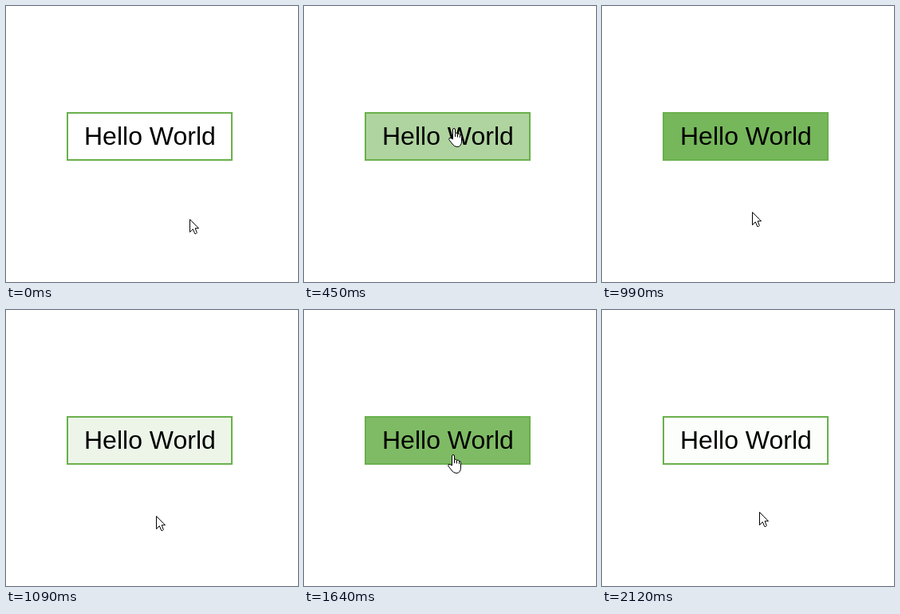
Recreate the animation shown at these times as an HTML page with a canvas. Size 366 by 346 pixels, loop 2180 ms.

```html
<!DOCTYPE html>
<html lang="en">
<head>
<meta charset="utf-8">
<title>Button hover</title>
<style>
  html, body { margin: 0; width: 100%; height: 100%; overflow: hidden; background: #fff; }
  canvas { display: block; }
</style>
</head>
<body>
<canvas id="stage" width="366" height="346"></canvas>
<script>
const ctx = document.getElementById('stage').getContext('2d');
const LOOP = 2180;
const GREEN = [106, 176, 76];
const button = { x: 76, y: 133, width: 208, height: 61, border: 2 };
const bottom = button.y + button.height;
const REACTION = 16;  // ms between crossing the edge and the start of the fade

// The pointer rests between glides; power > 1 speeds up, power < 1 slows down.
const glides = [
  { start: 140, end: 450, from: [230, 267], to: [189, 153], power: 2 },
  { start: 690, end: 700, from: [189, 153], to: [188, 152], power: 1 },
  { start: 900, end: 990, from: [188, 152], to: [188, 258], power: 2 },
  { start: 1310, end: 1670, from: [188, 258], to: [188, 178], power: .5 },
  { start: 1940, end: 2120, from: [188, 202], to: [197, 253], power: 1 }
];

const arrow = new Path2D('M.5 .5V16.5L4.3 12.7L6.8 18.5H8.2L9.3 17.3L7.2 11.7H11.5Z');
const hand = new Path2D('M5.5 14V2Q5.5 .5 7 .5Q8.5 .5 8.5 2V6.5Q10.5 5 11.5 7.5' +
  'Q13.5 6 14.5 8.5Q16.5 8 16.5 10.5V16Q16.5 23.5 11 23.5Q7.5 23.5 5 20' +
  'L.8 14.5Q.5 11.5 3 12.5Z');
const knuckles = new Path2D('M8.5 7V11M11.5 7.5V11.5M14.5 8.5V12');

const clamp = v => Math.min(1, Math.max(0, v));
const isOver = y => y < bottom;

// CSS "ease": cubic-bezier(.25, .1, .25, 1)
function ease(p) {
  const bezier = (a, b, s) => 3 * a * s * (1 - s) ** 2 + 3 * b * s * s * (1 - s) + s ** 3;
  let low = 0, high = 1;
  for (let i = 0; i < 20; i++) {
    const mid = (low + high) / 2;
    if (bezier(.25, .25, mid) < p) low = mid; else high = mid;
  }
  return bezier(.1, 1, low);
}

// Each glide that changes the hover state starts a fade where it meets the edge.
function findFades() {
  let over = false;
  return glides.flatMap(({ start, end, from, to, power }) => {
    if (isOver(to[1]) === over) return [];
    over = !over;
    const share = clamp((bottom - from[1]) / (to[1] - from[1]));
    const crossing = start + (end - start) * share ** (1 / power);
    return [{ start: crossing + REACTION, length: over ? 150 : 200, sign: over ? 1 : -1 }];
  });
}
const fades = findFades();

function pointerAt(t) {
  const { start, end, from, to, power } = glides.findLast(g => g.start <= t) || glides[0];
  const p = clamp((t - start) / (end - start)) ** power;
  return from.map((v, axis) => Math.round(v + (to[axis] - v) * p));
}

function fillAt(t) {
  return fades.reduce((sum, f) => sum + f.sign * ease(clamp((t - f.start) / f.length)), 0);
}

function drawPointer(x, y) {
  const over = isOver(y);
  const shape = over ? hand : arrow;
  ctx.save();
  ctx.translate(over ? x - 8 : x, y);
  ctx.fillStyle = '#fff';
  ctx.strokeStyle = '#000';
  ctx.fill(shape);
  ctx.stroke(shape);
  if (over) ctx.stroke(knuckles);
  ctx.restore();
}

function draw(t) {
  const { x, y, width, height, border } = button;
  const tint = GREEN.map(c => Math.round(255 + (c - 255) * fillAt(t)));

  ctx.fillStyle = '#fff';
  ctx.fillRect(0, 0, 366, 346);
  ctx.fillStyle = `rgb(${GREEN})`;
  ctx.fillRect(x, y, width, height);
  ctx.fillStyle = `rgb(${tint})`;
  ctx.fillRect(x + border, y + border, width - 2 * border, height - 2 * border);

  ctx.fillStyle = '#000';
  ctx.font = '32px "Liberation Sans", Arial, sans-serif';
  ctx.fillText('Hello World', 98, 174);
  drawPointer(...pointerAt(t));
}

const begin = performance.now();
function tick() {
  draw((performance.now() - begin) % LOOP);
  requestAnimationFrame(tick);
}
tick();
</script>
</body>
</html>
```
